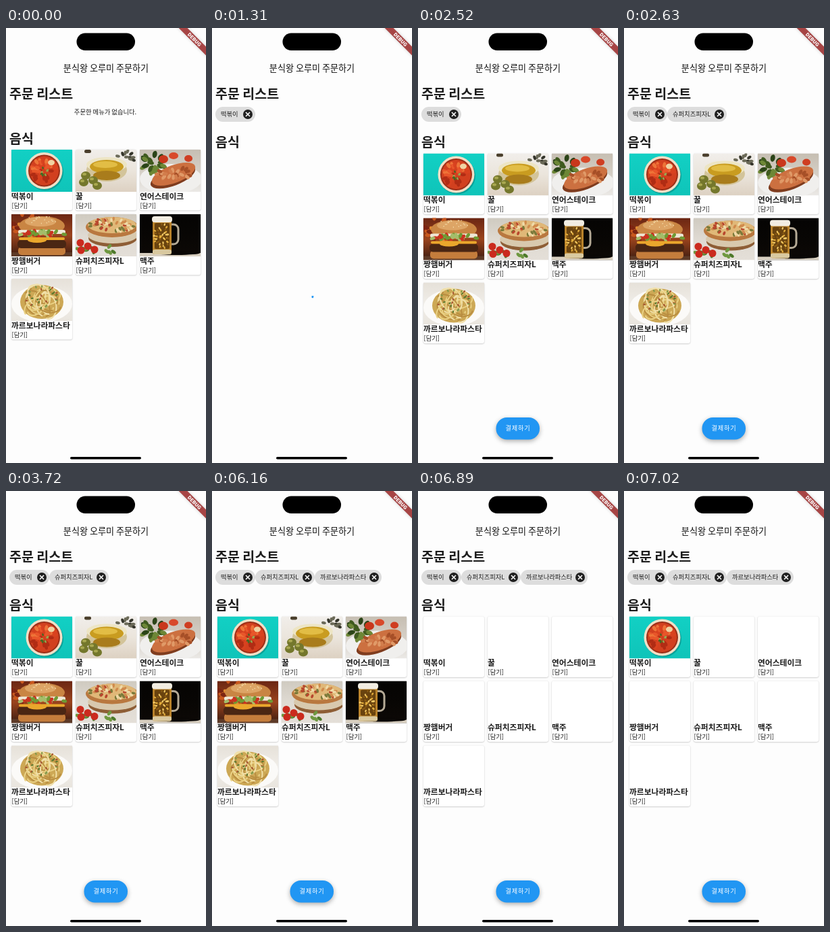
Animation of 296 by 640 pixels, one loop 8 s. Source, as an HTML page with a canvas:

```html
<!DOCTYPE html>
<html lang="ko">
<head>
<meta charset="utf-8">
<style>
html, body { margin: 0; width: 100%; height: 100%; overflow: hidden; background: #fdfdfd; }
canvas { display: block; }
</style>
</head>
<body>
<canvas id="stage" width="296" height="640"></canvas>
<script>
const c = document.getElementById('stage').getContext('2d');
const LOOP = 8000;
const FONT = '"Noto Sans CJK KR", "Noto Sans CJK", "Noto Sans", sans-serif';
const INK = '#1d1d1d';

// y is the visual middle of the line
function text(str, x, y, size, { weight = 400, color = INK, align = 'left', spacing = 0, font = FONT } = {}) {
  c.font = `${weight} ${size}px ${font}`;
  c.fillStyle = color;
  c.textAlign = align;
  c.letterSpacing = spacing + 'px';
  c.fillText(str, x, y + size * 0.37);
}

function box(color, x, y, w, h, r = 0) {
  c.fillStyle = color;
  c.beginPath();
  c.roundRect(x, y, w, h, r);
  c.fill();
}

function oval(color, x, y, rx, ry = rx, turn = 0) {
  c.fillStyle = color;
  c.beginPath();
  c.ellipse(x, y, rx, ry, turn, 0, 7);
  c.fill();
}

function fade(...stops) {
  const g = c.createLinearGradient(0, 0, 0, 62);
  stops.forEach((s, i) => g.addColorStop(i / (stops.length - 1), s));
  box(g, 0, 0, 90, 62);
}

function withShadow(color, blur, dy, paint) {
  c.save();
  c.shadowColor = color;
  c.shadowBlur = blur;
  c.shadowOffsetY = dy;
  paint();
  c.restore();
}

// Seeded crumbs spread over an ellipse
function crumbs(colors, n, x, y, rx, ry, size) {
  let seed = n * 7 + x;
  const rnd = () => (seed = (seed * 16807 + 11) % 2147483647) / 2147483647;
  rnd(); rnd();
  for (let i = 0; i < n; i++) {
    const a = rnd() * 6.28, d = Math.sqrt(rnd());
    oval(colors[i % colors.length], x + rx * d * Math.cos(a), y + ry * d * Math.sin(a), size, size * 0.6, a);
  }
}

// Each picture fills 90 x 62
const dishes = [
  ['떡볶이', () => {
    fade('#12d0c4', '#0fc4b9');
    oval('#0aa198', 50, 33, 27);
    oval('#f3dfc6', 48.5, 31, 27);
    oval('#9c2f18', 48.5, 31, 23.5);
    oval('#d2401f', 48.5, 31, 21.5);
    crumbs(['#e8562a', '#b02c14', '#ee7438', '#d9421f'], 34, 48, 31, 18, 17, 4);
    oval('#f0d3a2', 59, 19, 5, 4);
    crumbs(['#3f6b22', '#9aa650'], 9, 48, 32, 6, 6, 2);
  }],
  ['꿀', () => {
    fade('#f1eeea', '#ebe5dc', '#ddd1c2');
    box('#4a3f2c', 13, 0, 10, 5, 3);
    crumbs(['#35352b', '#6b6a58'], 14, 72, 11, 15, 10, 3.5);
    oval('#d3c49a', 46, 30, 30, 17);
    oval('#ede5c4', 46, 22, 30, 11);
    oval('#c99c20', 46, 25, 25, 10);
    oval('#e2bd45', 44, 22, 18, 5);
    oval('#a97c1c', 46, 38, 20, 7);
    for (const [x, y] of [[15, 38], [26, 45], [12, 48], [32, 53]]) {
      oval('#74772c', x, y, 7, 6);
      oval('#a9a850', x - 2, y - 2, 3, 2);
    }
  }],
  ['연어스테이크', () => {
    fade('#c6beb2', '#d5cfc6', '#ebe9e6');
    oval('#f0efed', 46, 43, 46, 22);
    crumbs(['#3f5a1e', '#6d8736', '#2b4418'], 26, 20, 20, 18, 14, 5);
    oval('#c9371c', 35, 14, 7, 6);
    oval('#d8492a', 50, 9, 7, 5);
    oval('#cf3e22', 72, 13, 6, 5);
    oval('#7f3c1e', 49, 40, 35, 13, -0.36);
    oval('#cc7040', 50, 36, 34, 13, -0.36);
    crumbs(['#e09a68', '#a64f27', '#d27d4c'], 26, 51, 35, 26, 9, 4);
  }],
  ['짱햄버거', () => {
    fade('#6b2613', '#9a431d', '#3b1b10');
    crumbs(['#c9581e', '#7c2412', '#e08a31'], 14, 18, 22, 20, 24, 5);
    box('#5d3a27', 0, 56, 90, 6);
    box('#c47d3c', 10, 48, 70, 12, 5);
    oval('#c98543', 45, 17, 34, 14);
    oval('#dda566', 43, 11, 23, 7);
    crumbs(['#f4dcaa'], 20, 44, 9, 25, 6, 1);
    box('#efe7d6', 10, 23, 70, 6, 3);
    crumbs(['#6f9a34', '#c93320', '#a4bd6a'], 24, 45, 29, 34, 4, 4);
    box('#4a2613', 9, 38, 72, 12, 5);
    box('#eaa72c', 11, 34, 68, 4, 2);
    oval('#eaa72c', 38, 38, 14, 4);
  }],
  ['슈퍼치즈피자L', () => {
    fade('#cfcac0', '#dfdad2', '#e4dfd8');
    oval('#8e5e36', 55, 35, 36, 13);
    oval('#d8c9ae', 55, 31, 37, 12);
    oval('#b9783f', 54, 19, 39, 15);
    oval('#e0b878', 54, 16, 36, 12);
    crumbs(['#b8472d', '#efdaa8', '#d08a4c', '#7b7a3a'], 46, 54, 16, 33, 10, 3);
    crumbs(['#4e7a2b', '#6f9840'], 12, 32, 52, 30, 6, 4);
    for (const [x, y] of [[7, 42], [18, 47], [8, 53], [28, 52]]) oval('#cb2a1e', x, y, 5.5);
  }],
  ['맥주', () => {
    fade('#050403', '#080604', '#0d0906');
    box('#d8cfc0', 0, 57, 90, 5);
    oval('#0a0705', 55, 57, 34, 3);
    c.strokeStyle = '#b5aa96';
    c.lineWidth = 3;
    c.beginPath();
    c.roundRect(40, 15, 17, 29, 7);
    c.stroke();
    box('#b9822a', 19, 5, 28, 54, 3);
    box('#69430f', 22, 13, 22, 38, 2);
    crumbs(['#e3ad3c', '#8a5a14', '#f0c764'], 44, 33, 32, 12, 18, 2);
    box('#d9c9a0', 19, 52, 28, 7, 3);
    box('#f2ede2', 18, 3, 30, 9, 4);
  }],
  ['까르보나라파스타', () => {
    fade('#e6e1d9', '#f0ede8', '#e9e5de');
    oval('#fbfaf8', 45, 37, 45, 27);
    oval('#cda855', 45, 34, 32, 25);
    c.lineWidth = 2;
    for (let i = 0; i < 22; i++) {
      c.strokeStyle = ['#ead184', '#b98d40', '#f1e0a8'][i % 3];
      c.beginPath();
      c.ellipse(45 + 11 * Math.sin(i * 2.4), 33 + 9 * Math.cos(i * 1.7), 17, 11, i, 0, 3.5);
      c.stroke();
    }
    crumbs(['#5f7a30', '#a5552f', '#86994a'], 26, 45, 27, 24, 19, 2);
  }],
];

const orders = [0, 4, 6];
const chipEdges = [5, 64, 152, 251];

function chip(i) {
  const x = chipEdges[i], end = chipEdges[i + 1];
  box('#dddddd', x, 116, end - x, 22, 11);
  text(dishes[orders[i]][0], x + 8, 127, 9.3);
  oval('#202020', end - 11, 127, 7);
  c.strokeStyle = '#fff';
  c.lineWidth = 1.6;
  c.beginPath();
  for (const s of [-1, 1]) {
    c.moveTo(end - 14, 127 - 3 * s);
    c.lineTo(end - 8, 127 + 3 * s);
  }
  c.stroke();
}

function card(i, top, loaded) {
  const [name, picture] = dishes[i];
  c.save();
  c.translate(8 + 95 * (i % 3), top + 95 * Math.floor(i / 3));
  withShadow('rgba(0,0,0,.28)', 2, 0.6, () => box('#fff', 0, 0, 90, 89.5, 3));
  if (loaded) {
    c.save();
    c.beginPath();
    c.rect(0, 0, 90, 62);
    c.clip();
    picture();
    c.restore();
  }
  text(name, 0, 68.5, 11.8, { weight: 700 });
  text('[담기]', 0.5, 82.5, 9.3);
  c.restore();
}

const ease = p => p * p * (3 - 2 * p);

function spinner(ms, y) {
  const phase = ms / 1333 % 1;
  const head = ease(Math.min(1, phase * 2));
  const tail = ease(Math.max(0, phase * 2 - 1));
  const start = Math.PI * (-0.5 + tail * 1.5 + ms / 2222 * 2 + phase * 0.5);
  const sweep = Math.max((head - tail) * Math.PI * 1.5, 0.2);
  c.strokeStyle = '#2196f3';
  c.lineWidth = 3;
  c.beginPath();
  c.arc(147.5, y, 13.5, start, start + sweep);
  c.stroke();
}

function payButton() {
  withShadow('rgba(0,0,0,.32)', 7, 2.5, () => box('#2196f3', 115.5, 573, 64.5, 32.5, 16));
  text('결제하기', 148, 589, 9.2, { color: '#fff', align: 'center', spacing: 0.8 });
}

function debugBanner() {
  c.save();
  c.translate(296, 0);
  c.rotate(Math.PI / 4);
  withShadow('rgba(0,0,0,.5)', 5, 0, () => box('rgba(0,0,0,.35)', -32, 19.5, 64, 9));
  box('rgba(183,28,28,.63)', -32, 19.5, 64, 9);
  text('DEBUG', 0, 24, 7.5, { weight: 900, color: '#fff', align: 'center', spacing: 0.2, font: 'Roboto, sans-serif' });
  c.restore();
}

// [start, chips, spinner start or null, pictures loaded]
const steps = [
  [0, 0, null, 7],
  [1310, 1, 1310, 0],
  [1420, 1, null, 7],
  [2630, 2, null, 7],
  [6160, 3, null, 7],
  [6630, 0, 6630, 0],
  [6740, 3, 6630, 0],
  [6890, 3, null, 0],
  [7020, 3, null, 1],
];

function draw(t) {
  const [, chips, spinStart, loaded] = steps.findLast(s => s[0] <= t);
  box('#fdfdfd', 0, 0, 296, 640);
  box('#000', 104.5, 7.5, 86.5, 25.5, 12.7);
  text('분식왕 오루미 주문하기', 148, 59, 13.1, { color: '#111', align: 'center' });
  text('주문 리스트', 5, 97, 19.5, { weight: 700 });
  if (chips) for (let i = 0; i < chips; i++) chip(i);
  else text('주문한 메뉴가 없습니다.', 147, 124, 9.3, { align: 'center' });
  text('음식', 5, chips ? 168 : 162.5, 19.5, { weight: 700 });
  if (spinStart !== null) {
    spinner(t - spinStart, chips ? 409 : 406.5);
  } else {
    dishes.forEach((_, i) => card(i, chips ? 184.5 : 179, i < loaded));
    if (chips) payButton();
  }
  debugBanner();
  box('#000', 95, 631, 105, 3.5, 1.75);
}

const begin = performance.now();
function tick() {
  draw((performance.now() - begin) % LOOP);
  requestAnimationFrame(tick);
}
tick();
</script>
</body>
</html>
```
